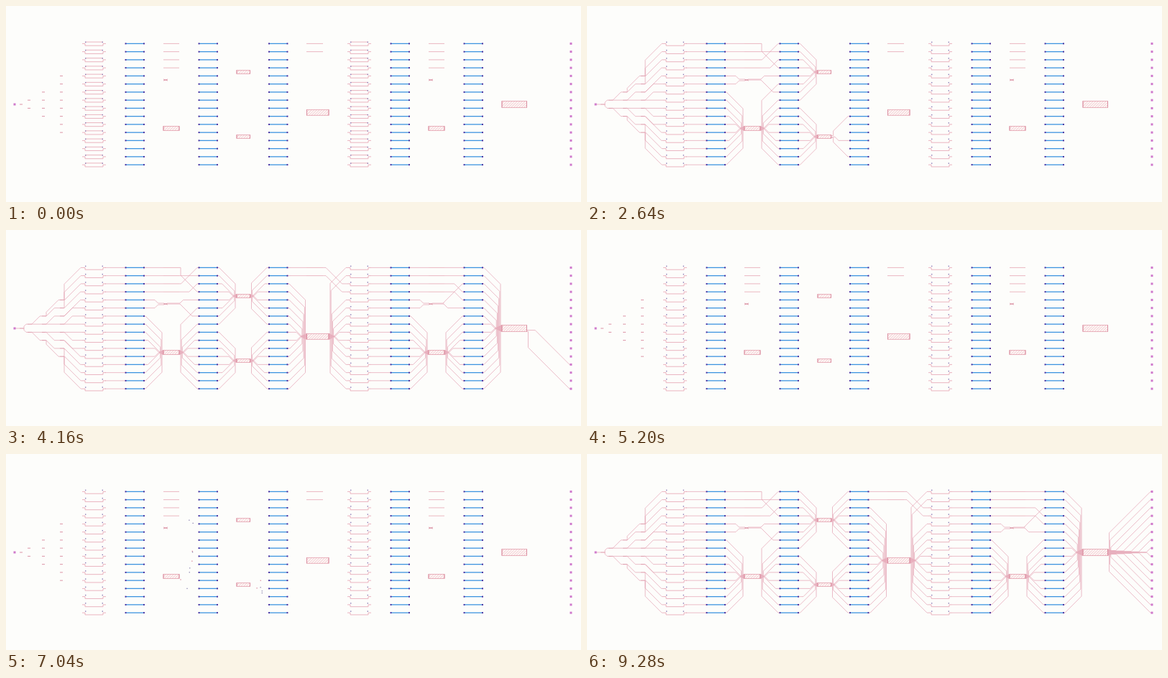
Recreate the animation shown at these times as an HTML page with a canvas. Size 800 px wide and 273 px high, loop 9.32 s.

```html
<!DOCTYPE html>
<html lang="en">
<head>
<meta charset="utf-8">
<title>Photonic circuit routing</title>
<style>
  html, body { margin: 0; width: 100%; height: 100%; overflow: hidden; background: #fdfdfb; }
  canvas { display: block; width: 800px; height: 273px; }
</style>
</head>
<body>
<canvas id="stage" width="800" height="273"></canvas>
<script>
const ctx = document.getElementById('stage').getContext('2d');
const LOOP = 9320, TICK = 40;
const PHASE_2 = 4880, FIRST_WAYPOINT = 6000, BULK_ROUTE = 8680;
const ROSE = '#d98a9c', PINK = '#e6a5b2', VIOLET = '#cf78cc';
const HALF = 369; // distance between the two similar halves of the chip

const range = (a, b) => Array.from({ length: b - a }, (_, i) => a + i);
const rowY = i => 52.4 + 11.25 * i;
const ROWS = range(0, 16);

function line(points, color, width) {
  ctx.strokeStyle = color;
  ctx.lineWidth = width;
  ctx.beginPath();
  points.forEach(([x, y]) => ctx.lineTo(x, y));
  ctx.stroke();
}

function dot(x, y, size, color) {
  ctx.fillStyle = color;
  ctx.fillRect(x - size / 2, y - size / 2, size, size);
}

// ---- components ----
const coupler = (x, end, y, h) => ({ x, end, y, h });
const mmiA = coupler(219, 241, 170.5, 6);
const mmiTop = coupler(321, 339.5, 92, 5);
const mmiLow = coupler(321, 339.5, 182, 5);
const mmiMid = coupler(418.5, 449, 148.3, 8);
const mmiB = coupler(219 + HALF, 241 + HALF, 170.5, 6);
const mmiEnd = coupler(690, 724.5, 137, 9);

// Binary splitter tree: level l has 2^l nodes
const levelX = [21, 32, 52, 77, 108];
const nodeY = (level, j) => level ? rowY(8 - 2 ** (level - 1) + j) : 137;

function drawCoupler({ x, end, y, h }) {
  const top = y - h / 2, w = end - x;
  ctx.save();
  ctx.beginPath();
  ctx.rect(x, top, w, h);
  ctx.clip();
  ctx.fillStyle = '#fdf6f5';
  ctx.fillRect(x, top, w, h);
  for (let s = x - h; s < end; s += 3.6) line([[s, top + h], [s + h, top]], '#eaa9b4', 0.6);
  ctx.restore();
  ctx.strokeStyle = '#e4a0ad';
  ctx.lineWidth = 0.8;
  ctx.strokeRect(x, top, w, h);
  for (const side of [x, end]) line([[side, top], [side, top + h]], ROSE, 0.9);
}

function drawInterferometer(x, y, closed) {
  line([[x, y], [x + 4, y], [x + 4, y + 2.8], [x + 29, y + 2.8], [x + 29, y], [x + 33, y]], '#e59bab', 0.75);
  if (closed) line([[x + 4, y - 2.3], [x + 29, y - 2.3]], '#e59bab', 0.75);
  for (const dx of [4.7, 28.3]) dot(x + dx, y - 2, 1.4, '#8a79b4');
}

function drawShifter(x, y) {
  line([[x, y], [x + 26.5, y]], '#3d94e0', 1.3);
  for (const dx of [0.5, 26]) dot(x + dx, y, 1.9, '#46299c');
}

function drawCrossing(x, y) {
  line([[x, y - 1], [x + 6, y + 1]], ROSE, 0.8);
  line([[x, y + 1], [x + 6, y - 1]], ROSE, 0.8);
}

function drawComponents(closed) {
  dot(12, 137, 3, VIOLET);
  for (const level of range(0, 4))
    for (const j of range(0, 2 ** level)) {
      const x = levelX[level], y = nodeY(level, j);
      line([[x - 2, y], [x + 2, y]], ROSE, 0.9);
    }
  for (const i of ROWS) {
    const y = rowY(i);
    for (const x of [106, 475]) drawInterferometer(x, y, closed);
    for (const x of [166, 268, 365.5, 166 + HALF, 268 + HALF]) drawShifter(x, y);
    dot(786, y, 3, VIOLET);
    if (i < 4) for (const x of [219, 219 + HALF]) line([[x, y], [x + 22, y]], PINK, 0.8);
    if (i < 2) line([[418, y], [441, y]], PINK, 0.8);
  }
  for (const x of [219, 219 + HALF]) drawCrossing(x, 103);
  [mmiA, mmiTop, mmiLow, mmiMid, mmiB, mmiEnd].forEach(drawCoupler);
}

// ---- routes ----
const routes = [];
const add = points => routes.push(points);

// Leave a for `gap`, run vertically if needed, then 45 degrees towards b
function bend(ax, ay, bx, by, gap = 2) {
  const dir = Math.sign(bx - ax), side = Math.sign(by - ay);
  const turn = ax + dir * gap;
  const d = Math.min(Math.abs(by - ay), Math.max(0, Math.abs(bx - turn) - 2));
  return [[ax, ay], [turn, ay], [turn, by - side * d], [turn + dir * d, by], [bx, by]];
}

// Same, with the diagonal as close to b as possible
const lateBend = (ax, ay, bx, by, gap = 2) =>
  bend(ax, ay, bx, by, Math.max(gap, Math.abs(bx - ax) - Math.abs(by - ay) - 2));

const straight = (x0, x1, rows) => rows.forEach(i => add([[x0, rowY(i)], [x1, rowY(i)]]));

// Inner ports reach further out, which gives the wedge beside each coupler
function fan(mmi, x, rows, first = [], shape = bend) {
  const n = rows.length, port = x < mmi.x ? mmi.x : mmi.end;
  for (const i of [...first, ...rows.filter(r => !first.includes(r))]) {
    const k = rows.indexOf(i), inner = Math.min(k, n - 1 - k);
    const y = mmi.y + (k - (n - 1) / 2) * mmi.h / n;
    add(shape(port, y, x, rowY(i), 2 + inner * 1.15));
  }
}

function tree() {
  add([[12, 137], [19, 137]]);
  for (const level of range(0, 4))
    for (const j of range(0, 2 ** (level + 1)))
      add(bend(levelX[level] + 2, nodeY(level, j >> 1), levelX[level + 1] - 2, nodeY(level + 1, j)));
}

function intoCouplers(x, mmi) {
  straight(x, x + 27, range(0, 4));
  add(bend(x, rowY(4), x + 27, 102, 15));
  add(bend(x, rowY(5), x + 27, 104, 15));
  fan(mmi, x, range(6, 16));
}

// Entry i of `targets` is the row reached from row i; 4 and 5 leave the crossing
function permute(x, targets, crossingEnd) {
  targets.forEach((to, i) => add(i < 4
    ? lateBend(x, rowY(i), x + 27, rowY(to))
    : bend(x - 16, 98 + i, x + 27, rowY(to), crossingEnd)));
}

tree();
straight(138, 166, ROWS);
intoCouplers(192, mmiA);
permute(241, [3, 1, 0, 2, 4, 6], 17);
fan(mmiA, 268, [5, ...range(7, 16)]);
fan(mmiTop, 294.5, range(0, 8));
fan(mmiLow, 294.5, range(8, 16));
fan(mmiLow, 365, range(8, 16), [9, 12, 14]);
fan(mmiTop, 365, range(0, 8));
straight(392, 418, [0, 1]);
fan(mmiMid, 392, range(2, 16));
for (const i of [0, 1]) add(bend(441, rowY(i), 475, rowY(i + 2), 4));
fan(mmiMid, 475, [0, 1, ...range(4, 16)]);
straight(508, 535, ROWS);
intoCouplers(192 + HALF, mmiB);
permute(241 + HALF, [0, 1, 3, 4, 2, 5], 15);
fan(mmiB, 637, range(6, 16));
fan(mmiEnd, 663, ROWS);
fan(mmiEnd, 786, ROWS, [12, 15], lateBend);

// ---- waypoints, scattered zone by zone from left to right ----
let seed = 7;
const random = () => (seed = seed * 16807 % 2147483647) / 2147483647;
const scatter = (x, y, w, h, n) => range(0, n).map(() => [x + w * random(), y + h * random()]);
const waypoints = [
  [243, 175],
  ...scatter(252, 64, 10, 134, 8),
  ...scatter(348, 175, 9, 23, 5),
  ...scatter(452, 75, 14, 103, 7),
  ...scatter(611, 75, 16, 107, 7),
  ...scatter(731, 110, 42, 88, 6)
];

// ---- timing ----
// [time, routes finished]
const pace = [[1160, 0], [1600, 31], [2640, 98], [4160, 209], [4360, routes.length]];

function routesAt(t) {
  if (t >= BULK_ROUTE) return routes.length;
  if (t < pace[0][0] || t >= PHASE_2) return 0;
  const next = pace.findIndex(p => t < p[0]);
  if (next < 0) return routes.length;
  const [t0, n0] = pace[next - 1], [t1, n1] = pace[next];
  return Math.floor(n0 + (n1 - n0) * (t - t0) / (t1 - t0) + 1e-6);
}

const waypointsAt = t =>
  t < FIRST_WAYPOINT || t >= BULK_ROUTE ? 0 : 1 + Math.floor((t - FIRST_WAYPOINT) / 80);

function draw(now) {
  const t = Math.floor((now % LOOP) / TICK) * TICK;
  ctx.fillStyle = '#fdfdfb';
  ctx.fillRect(0, 0, 800, 273);
  routes.slice(0, routesAt(t)).forEach(points => line(points, '#e29aac', 0.65));
  drawComponents(t < TICK);
  waypoints.slice(0, waypointsAt(t)).forEach(([x, y], i) =>
    dot(x, y, 1.3, i % 3 ? '#8d86b0' : ROSE));
}

const start = performance.now();
function tick() {
  draw(performance.now() - start);
  requestAnimationFrame(tick);
}
tick();
</script>
</body>
</html>
```
